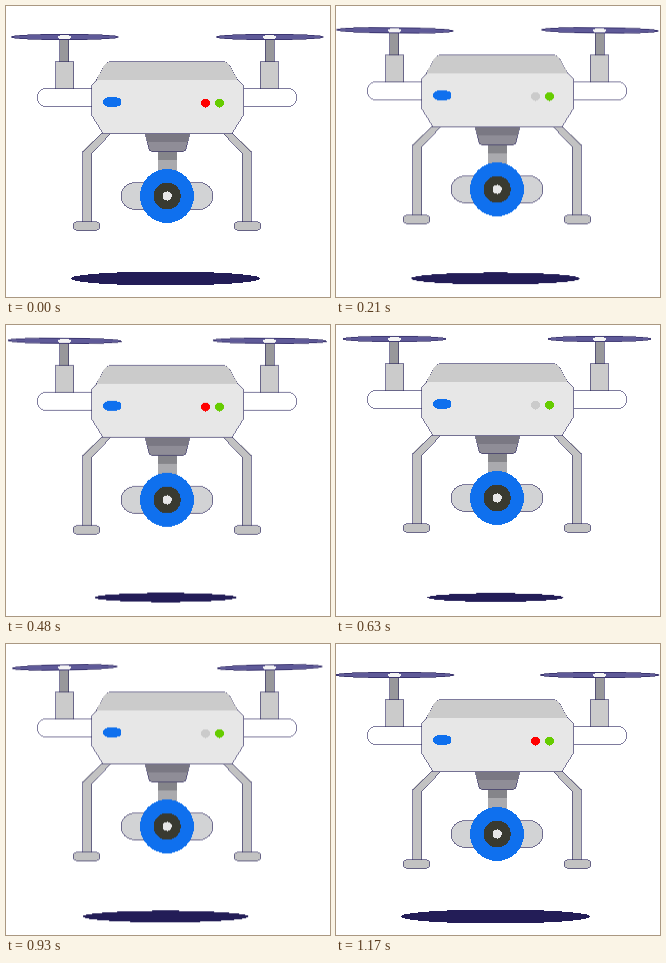
Write an HTML page without scripts that moves like this. It is 324 by 291 pixels and loops after 1.2 s.

```html
<!DOCTYPE html>
<html lang="en">
<head>
<meta charset="utf-8">
<title>Hovering drone</title>
<style>
  html, body { margin: 0; width: 100%; height: 100%; overflow: hidden; background: #fff; }
  svg { display: block; width: 324px; height: 291px; shape-rendering: crispEdges; }

  .line { stroke: #29235c; stroke-width: .6; }
  .light { fill: #e7e7e7; }
  .mid { fill: #cbcbcb; }
  .leg { fill: #c2c2c2; }
  .blue { fill: #0f70ee; }

  .drone { animation: hover 1.2s infinite; }
  .shadow { fill: #231d57; transform-origin: 159.5px 272.5px; animation: shrink 1.2s infinite; }
  .blade { fill: #5f5a98; transform-box: fill-box; transform-origin: center; animation: spin 1.2s linear infinite; }
  .hub { fill: #f4f4f4; }
  .alert { animation: blink .4s step-end infinite; }

  /* 30 ms steps, with a short rest at the top and bottom */
  @keyframes hover {
    0% { transform: none; animation-timing-function: steps(19); }
    47.5% { transform: translateY(-18px); animation-timing-function: step-end; }
    50% { transform: translateY(-18px); animation-timing-function: steps(19); }
    97.5%, 100% { transform: translateY(0); }
  }
  @keyframes shrink {
    0% { transform: scale(1, 1); animation-timing-function: steps(19); }
    47.5% { transform: scale(.7, .6); animation-timing-function: step-end; }
    50% { transform: scale(.7, .6); animation-timing-function: steps(19); }
    97.5%, 100% { transform: scale(1, 1); }
  }
  @keyframes spin {
    0%, 100% { transform: rotate(0deg) scaleX(1.07); }
    17.5% { transform: rotate(.6deg) scaleX(1.17); }
    27.5% { transform: rotate(.8deg) scaleX(1.24); }
    52.5% { transform: rotate(0deg) scaleX(1.04); }
    67.5% { transform: rotate(-.6deg) scaleX(.98); }
    77.5% { transform: rotate(-1deg) scaleX(1.05); }
    92.5% { transform: rotate(0deg) scaleX(1.25); }
    97.5% { transform: rotate(0deg) scaleX(1.2); }
  }
  @keyframes blink {
    0%, 75% { fill: #f00; }
    25% { fill: #cbcbcb; }
  }
</style>
</head>
<body>
<svg viewBox="0 0 324 291">
  <ellipse class="shadow" cx="159.5" cy="272.5" rx="95" ry="7"/>

  <g class="drone">
    <g id="side">
      <rect class="line" x="53.5" y="32" width="9" height="24" fill="#98989b"/>
      <rect class="line mid" x="49.5" y="55.5" width="18" height="28"/>
      <path class="line" fill="#fff" d="M90 82.5H40a9 9 0 0 0 0 18H90z"/>
      <path class="line leg" d="M96.5 126L76.5 145V217H85.5V148L106 126z"/>
      <rect class="line leg" x="67" y="215.5" width="27" height="9" rx="4.5"/>
    </g>
    <use href="#side" transform="matrix(-1 0 0 1 322 0)"/>

    <ellipse class="line blade" cx="58.5" cy="31" rx="50" ry="2.8"/>
    <ellipse class="line blade" cx="263.5" cy="31" rx="50" ry="2.8"/>
    <ellipse class="hub" cx="58.5" cy="31.2" rx="7" ry="2.2"/>
    <ellipse class="hub" cx="263.5" cy="31.2" rx="7" ry="2.2"/>

    <rect x="152" y="145" width="19" height="22" fill="#aaaaae"/>
    <rect x="152" y="145" width="19" height="9" fill="#85858a"/>
    <path class="line" fill="#8f8d97" d="M139 127H184L180 143Q179 145.5 177 145.5H146Q144 145.5 143 143z"/>
    <path fill="#7a7883" d="M139 127H184L181.7 136H141.3z"/>

    <path class="line mid" d="M90 74L98 59.5Q100.5 55.5 105 55.5H217Q221.5 55.5 224 59.5L232 74z"/>
    <path class="line light" d="M90 73.5H232L237.5 79V109L226 127.5H97L85.5 109V79z"/>
    <path class="mid" d="M91 73L98.5 59.5Q100.8 56 105 56H217Q221.2 56 223.5 59.5L231 73V74H91z"/>
    <rect class="blue" x="97" y="91.4" width="18.4" height="9.2" rx="4.6"/>
    <circle class="alert" cx="199.5" cy="97" r="4.5"/>
    <circle cx="213.5" cy="97" r="4.5" fill="#6c0"/>

    <rect class="line" x="115" y="176.5" width="92" height="27" rx="13.5" fill="#d2d3d5"/>
    <circle class="blue" cx="161" cy="190" r="27"/>
    <circle cx="161.2" cy="190" r="13.5" fill="#393a30"/>
    <circle class="light" cx="161.2" cy="190" r="4.6"/>
  </g>
</svg>
</body>
</html>
```
